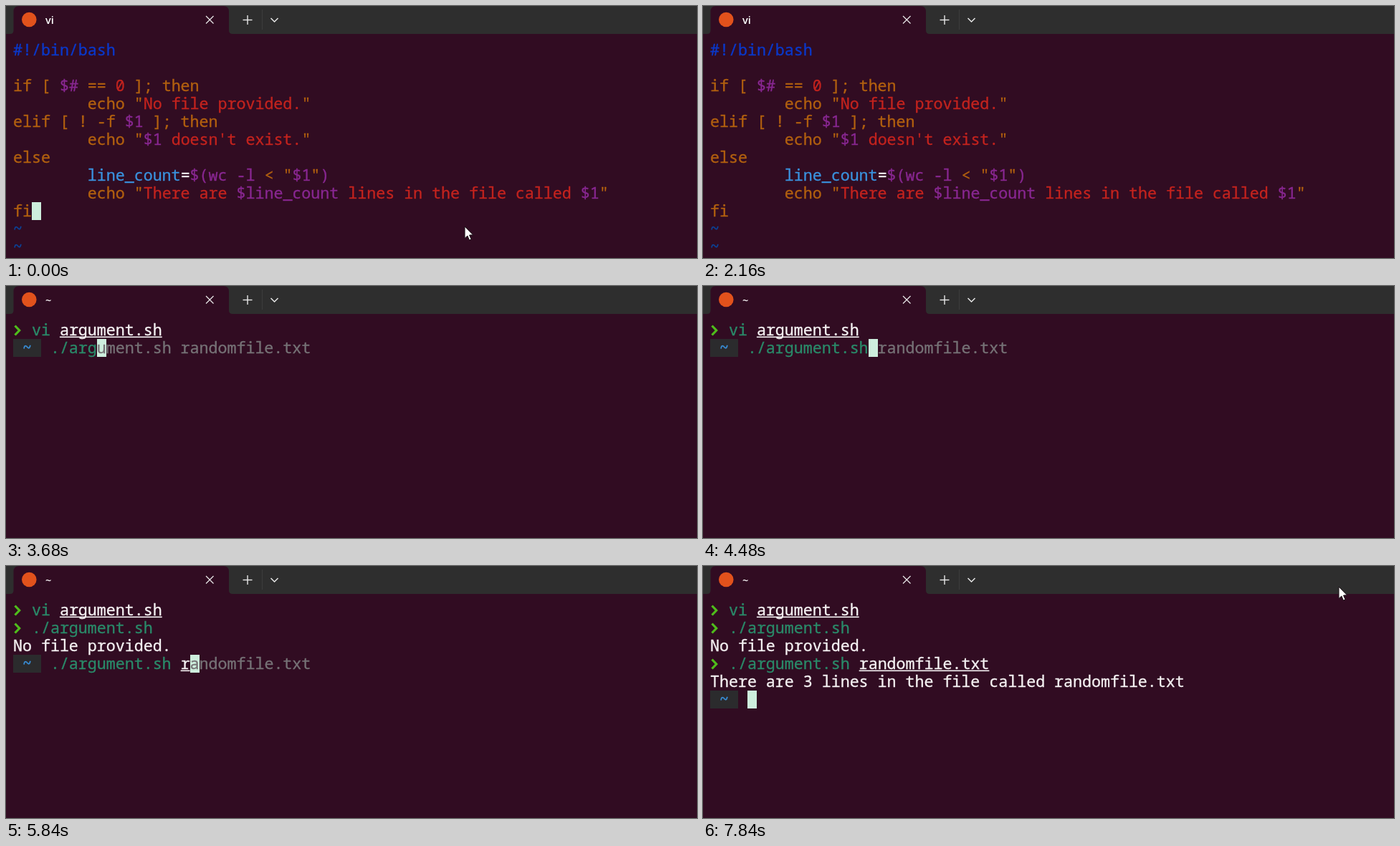
Recreate the animation shown at these times as an HTML page with a canvas. Size 964 by 352 pixels, loop 7.92 s.

```html
<!DOCTYPE html>
<html lang="en">
<head>
<meta charset="utf-8">
<title>Terminal</title>
<style>
  html, body { margin: 0; width: 100%; height: 100%; overflow: hidden; background: #310c22; }
  canvas { display: block; width: 964px; height: 352px; }
</style>
</head>
<body>
<canvas id="stage" width="964" height="352"></canvas>
<script>
const ctx = document.getElementById("stage").getContext("2d");
const LOOP = 7920, LEFT = 10, TOP = 49, COL = 12.98, ROW = 25;
const MONO = '500 21.63px "Noto Sans Mono", "DejaVu Sans Mono", monospace';
const BG = "#310c22", BAR = "#2e2e2e", CURSOR = "#cdeedd";

// The first letter of each text run picks its colour; "u" also underlines.
const INK = {
  b: "#0a38cb", o: "#b2600f", p: "#882791", r: "#c3231e", c: "#3a92de",
  w: "#f5f2f3", u: "#f5f2f3", g: "#2a8a69", d: "#767276", t: "#0b459c"
};

const SCRIPT = [
  "b#!/bin/bash",
  "",
  "oif [ |p$#|o == |r0|o ]; then",
  'o        echo "|rNo file provided.|o"',
  "oelif [ ! -f |p$1|o ]; then",
  'o        echo "|p$1|r doesn\'t exist.|o"',
  "oelse",
  'c        line_count|w=|p$(wc -l |o< "|p$1|o"|p)',
  'o        echo "|rThere are |p$line_count|r lines in the file called |p$1|o"',
  "ofi",
  "t~",
  "t~"
];

const CMD = "./argument.sh", ARG = "randomfile.txt", FULL = CMD + " " + ARG;

const colX = col => LEFT + col * COL;
const rowY = row => TOP + row * ROW;
const clamp = (v, lo, hi) => Math.max(lo, Math.min(hi, v));

function stroke(color, width, ...points) {
  ctx.strokeStyle = color;
  ctx.lineWidth = width;
  ctx.beginPath();
  points.forEach(([x, y], i) => i ? ctx.lineTo(x, y) : ctx.moveTo(x, y));
  ctx.stroke();
}

function text(str, col, row, key) {
  const x = colX(col), y = rowY(row);
  ctx.font = MONO;
  ctx.fillStyle = ctx.strokeStyle = INK[key];
  ctx.lineWidth = 0.35;
  ctx.fillText(str, x, y + 20);
  ctx.strokeText(str, x, y + 20);
  if (key === "u") ctx.fillRect(x, y + 21.5, str.length * COL, 1.6);
}

function line(markup, row, col = 0) {
  if (!markup) return;
  for (const run of markup.split("|")) {
    text(run.slice(1), col, row, run[0]);
    col += run.length - 1;
  }
}

function block(col, row) {
  ctx.fillStyle = CURSOR;
  ctx.fillRect(Math.round(colX(col)), rowY(row), 13, ROW);
}

function titleBar(title) {
  ctx.fillStyle = BAR;
  ctx.fillRect(0, 0, 964, 39);
  ctx.fillStyle = BG;
  ctx.beginPath();
  ctx.moveTo(6, 39);
  ctx.quadraticCurveTo(10.5, 39, 10.5, 34);
  ctx.lineTo(10.5, 8);
  ctx.quadraticCurveTo(10.5, 0, 18.5, 0);
  ctx.lineTo(303, 0);
  ctx.quadraticCurveTo(311, 0, 311, 8);
  ctx.lineTo(311, 34);
  ctx.quadraticCurveTo(311, 39, 316, 39);
  ctx.fill();

  ctx.fillStyle = "#e2521c";
  ctx.beginPath();
  ctx.arc(32.3, 19, 10.3, 0, 7);
  ctx.fill();

  ctx.font = '600 14.5px "Open Sans", "Noto Sans", sans-serif';
  ctx.fillStyle = "#fff";
  ctx.fillText(title, 55, 24.5);

  const icon = "#e8e8e8";
  stroke(icon, 1.3, [279, 14], [289.5, 24.5]);
  stroke(icon, 1.3, [289.5, 14], [279, 24.5]);
  stroke(icon, 1.4, [330.5, 19.5], [343.5, 19.5]);
  stroke(icon, 1.4, [337, 13], [337, 26]);
  stroke("#3c3c3c", 1, [357.5, 5], [357.5, 33]);
  stroke(icon, 1.5, [369.5, 17], [374.5, 22], [379.5, 17]);
}

function mouse(x, y) {
  const shape = [[0, 0], [0, 16.5], [3.8, 13], [6.4, 19], [9, 17.8], [6.5, 12], [11.5, 11.8]];
  ctx.beginPath();
  shape.forEach(([dx, dy]) => ctx.lineTo(x + dx, y + dy));
  ctx.closePath();
  ctx.fillStyle = "#fff";
  ctx.strokeStyle = "#1a1016";
  ctx.lineWidth = 1;
  ctx.fill();
  ctx.stroke();
}

// A finished command with its short prompt.
function done(markup, row) {
  const y = rowY(row);
  stroke("#4fbd1b", 3.2, [12.5, y + 6.5], [18.7, y + 13], [12.5, y + 19.5]);
  line(markup, row, 2);
}

// The live prompt with n letters typed and the rest suggested in grey.
function prompt(row, n) {
  const y = rowY(row);
  ctx.fillStyle = "#2b2b2d";
  ctx.fillRect(10, y, 39, ROW);
  line("c~", row, 1);
  block(4 + n, row);
  if (!n) return;
  text(FULL.slice(n), 4 + n, row, "d");
  text(FULL.slice(0, Math.min(n, CMD.length)), 4, row, "g");
  const arg = FULL.slice(CMD.length + 1, n);
  if (arg) text(arg, 5 + CMD.length, row, "u");
}

// Letters typed by time t, the first at start and the last of count at end.
const typed = (t, start, end, count) =>
  t < start ? 0 : clamp(1 + Math.floor((t - start) / (end - start) * (count - 1) + 1e-6), 1, count);

function editor(t) {
  titleBar("vi");
  if (t < 1680) block(3 - 1, 9);
  else if (t < 2080) block(1, 9);
  SCRIPT.forEach((markup, row) => line(markup, row));
  if (t < 1680) mouse(640, 308);
}

function shell(t) {
  titleBar("~");
  done("gvi |uargument.sh", 0);
  if (t < 4640) return prompt(1, typed(t, 3200, 4480, CMD.length));

  done("g" + CMD, 1);
  line("wNo file provided.", 2);
  if (t < 7120) {
    const n = t < 5840 ? typed(t, 4880, 5760, CMD.length + 1)
                       : CMD.length + 1 + typed(t, 5840, 6880, ARG.length);
    return prompt(3, n);
  }

  done("g" + CMD + " |u" + ARG, 3);
  line("wThere are 3 lines in the file called " + ARG, 4);
  prompt(5, 0);
  if (t >= 7440) {
    const k = 1 - (1 - clamp((t - 7440) / 400, 0, 1)) ** 2;
    mouse(906 - 19 * k, 1 + 28 * k);
  }
}

function draw(now) {
  const t = now % LOOP;
  ctx.fillStyle = BG;
  ctx.fillRect(0, 0, 964, 352);
  (t < 2640 ? editor : shell)(t);
}

const origin = performance.now();
function tick() {
  draw(performance.now() - origin);
  requestAnimationFrame(tick);
}
tick();
</script>
</body>
</html>
```
